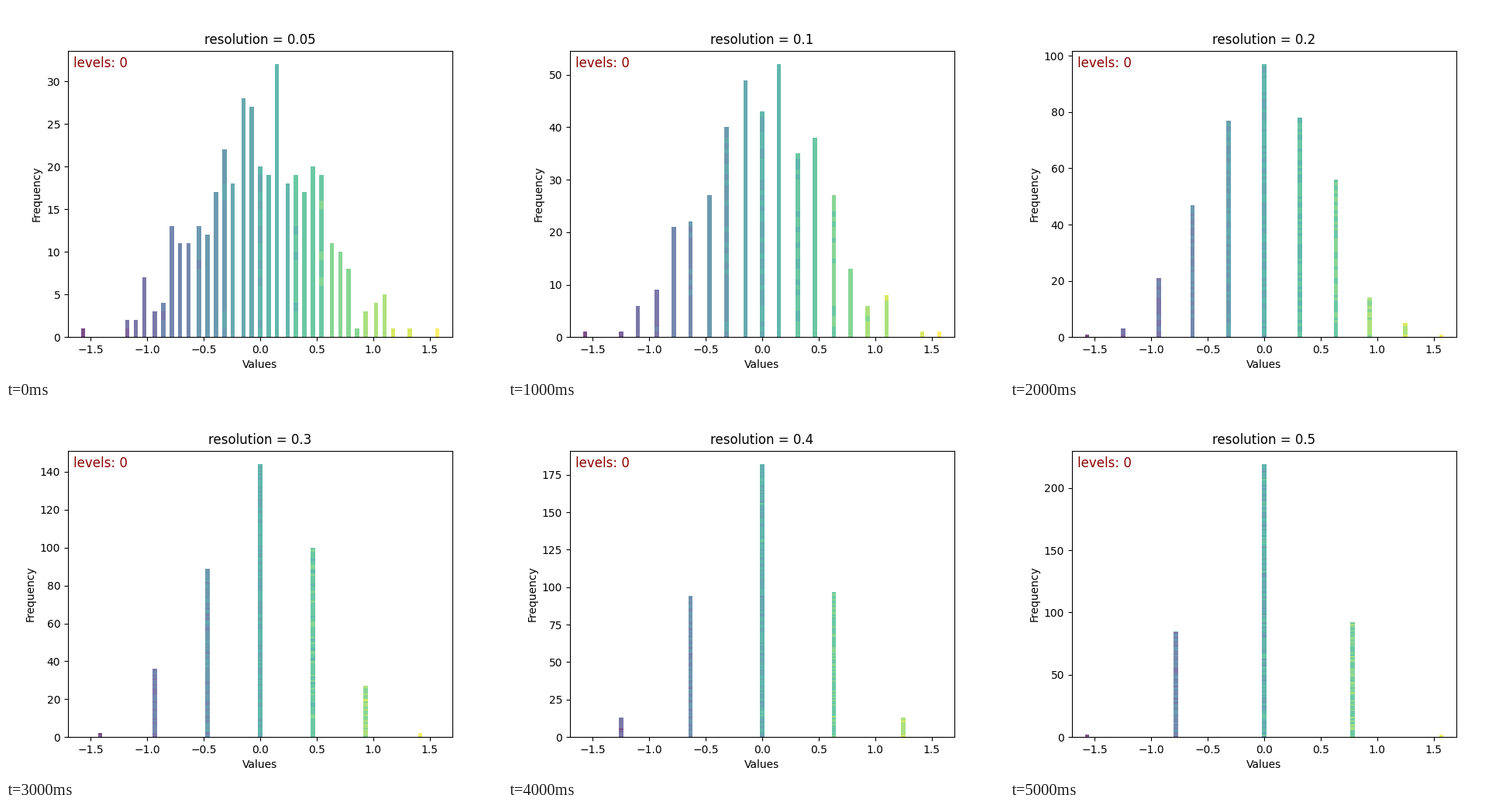
Recreate the animation shown at these times as a matplotlib script. Size 640 px wide and 480 px high, loop 6 s.

```python
import numpy as np
import matplotlib.pyplot as plt
from matplotlib.animation import FuncAnimation

RESOLUTIONS = [0.05, 0.1, 0.2, 0.3, 0.4, 0.5]
FINEST = RESOLUTIONS[0]
CELL, CELLS = 0.01863, 84       # bars snap to a grid of 84 cells up to pi / 2
CLASS_WIDTH = 0.29              # values share a colour within this width

# Samples per finest bin, from -15 to 15; three outliers lie beyond.
HEIGHTS = [2, 2, 7, 3, 4, 13, 11, 11, 13, 12, 17, 22, 18, 28, 27, 20,
           19, 32, 18, 19, 17, 20, 19, 11, 10, 8, 1, 3, 4, 5, 1]
OUTLIERS = [-20, 17, 20]


def spread(k, count):
    """Even spread of samples inside bin k, shifted by a slow wave."""
    shift = 0.04 + 0.05 * np.cos(np.pi / 3 * k + 0.175)
    offsets = (np.arange(count) + 0.5) / count - 0.5 + shift
    return (k + np.clip(offsets, -0.49, 0.49)) * FINEST


def make_samples():
    """Shuffled samples in units of pi / 2."""
    bins = list(enumerate(HEIGHTS, start=-15)) + [(k, 1) for k in OUTLIERS]
    samples = np.concatenate([spread(k, n) for k, n in bins])
    return np.random.default_rng(4).permutation(samples)


def class_colors(values):
    centres = (np.floor(values / CLASS_WIDTH) + 0.5) * CLASS_WIDTH
    return plt.cm.viridis(np.clip(centres / np.pi + 0.5, 0, 1))


def stack_levels(bins):
    """Number of earlier samples in the same bin."""
    levels = np.zeros(bins.size)
    for b in np.unique(bins):
        same = bins == b
        levels[same] = np.arange(same.sum())
    return levels


samples = make_samples()
colors = class_colors(samples * np.pi / 2)
fig, ax = plt.subplots(figsize=(6.4, 4.8), dpi=100)


def update(frame):
    res = RESOLUTIONS[frame]
    bins = np.round(samples / res)
    levels = stack_levels(bins)
    ax.clear()
    ax.bar(np.round(CELLS * bins * res) * CELL, 1, width=2 * CELL,
           bottom=levels, color=colors, alpha=0.7)
    ax.set_xlim(-1.7, 1.7)
    ax.set_ylim(0, 1.05 * (levels.max() + 1))
    ax.set_title(f"resolution = {res}")
    ax.set_xlabel("Values")
    ax.set_ylabel("Frequency")
    ax.text(0.015, 0.941, "levels: 0", transform=ax.transAxes,
            fontsize=12, color="darkred")
    return []


anim = FuncAnimation(fig, update, frames=len(RESOLUTIONS), interval=1000,
                     init_func=lambda: update(0), repeat=True, repeat_delay=0)
plt.show()
```
